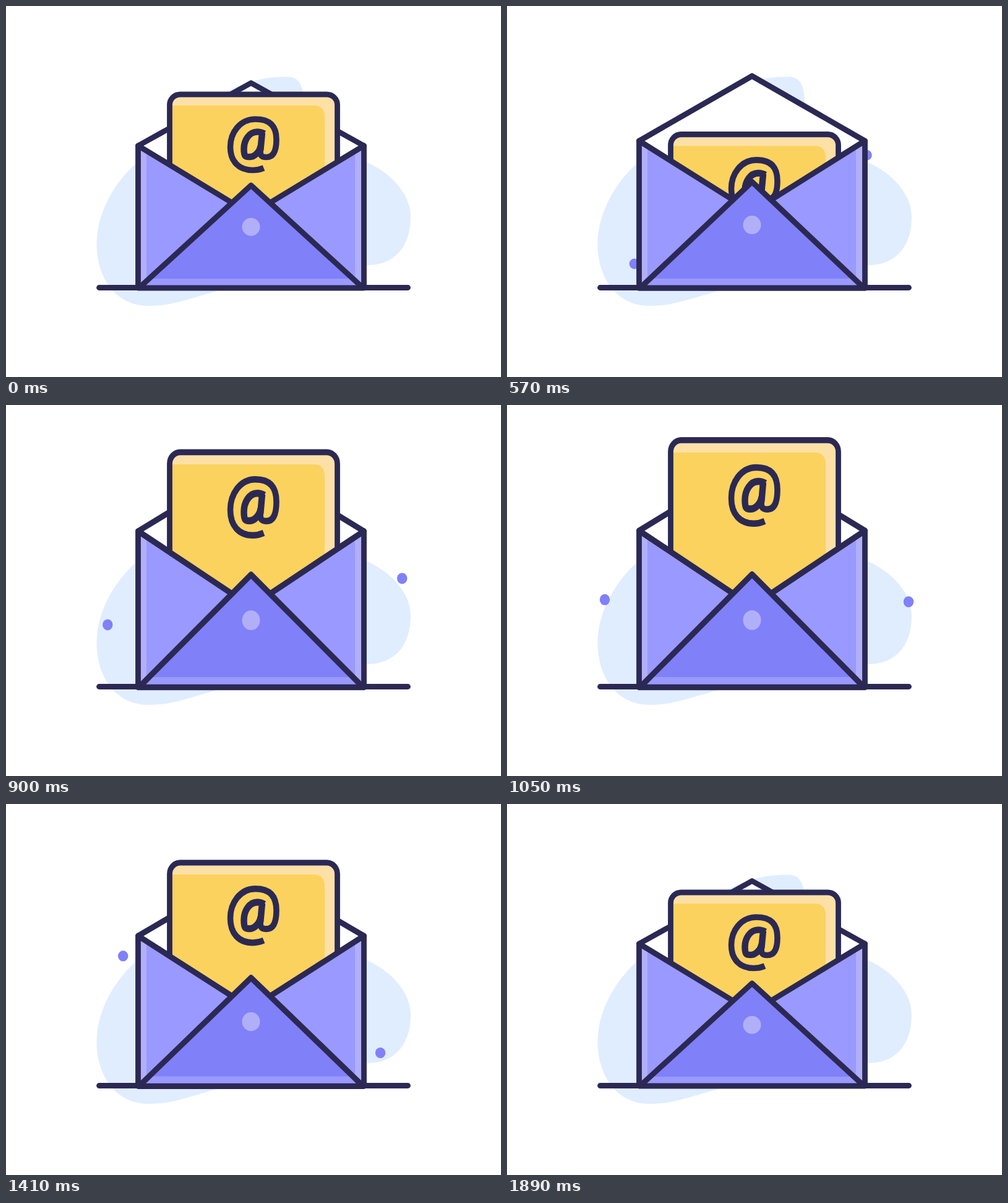
Animation of 800x600 px, one loop 1950 ms. Source, as an HTML page:

```html
<!DOCTYPE html>
<html lang="en">
<head>
<meta charset="utf-8">
<title>Mail</title>
<style>
  html, body { margin: 0; width: 100%; height: 100%; overflow: hidden; background: #fff; }
  svg { display: block; width: 100vw; height: 100vh; }
  .line { stroke: #2b2954; stroke-width: 8.8; stroke-linecap: round; stroke-linejoin: round; }
  .none { fill: none; }
  .dot { fill: #8080f9; }
  .panel { fill: #9a99ff; }
  .shine { fill: #b1aff8; }
</style>
</head>
<body>
<svg viewBox="0 0 800 600">
  <defs>
    <clipPath id="pocket"><rect x="200" y="-50" width="400" height="480"/></clipPath>
  </defs>

  <path fill="#e0edff" d="M146.5 385C146.5 335 175 285 212 253S290 175 340 147S420 114.500 455 114.500C476 114.500 481 132 481 160S505 237 550 243S654 290 654 341S625 419 585 419S400 443 340 461S262 485 231 485C175 485 146.500 437 146.500 385Z"/>
  <path class="line" d="M150.500 455.500H649.500"/>

  <g id="mail">
    <path class="line" fill="#fff" d="M213.500 226L396 124.500L578.500 226L396 336Z"/>
    <circle id="left" class="dot" r="8.200"/>
    <circle id="right" class="dot" r="8.200"/>

    <g clip-path="url(#pocket)">
      <g id="card">
        <rect x="264.500" y="143" width="271" height="290" rx="17" fill="#fde0a6"/>
        <path fill="#fcd25f" d="M266 161H497Q515 161 515 179V431H266Z"/>
        <rect class="line none" x="264.500" y="143" width="271" height="290" rx="17"/>
        <g class="none" stroke="#2b2954">
          <path stroke-width="9.600" d="M416.500 262Q408 265.500 399 265.500C376 265.500 362.500 251 362.500 228S378 183 403 183S437 196 437 216S431 244.500 421 244.500S410.500 240 411.500 231"/>
          <path stroke-width="10.500" d="M411.300 233L414 205M417.500 206.500Q412 203.500 406 203.500C393 203.500 384.500 217 384.500 231S388 244 394.500 244S410.500 236 411.500 226"/>
        </g>
      </g>
    </g>

    <path class="panel" d="M213.500 226L365 318L396 290L427 318L578.500 226V456H213.500Z"/>
    <path class="shine" d="M213.500 226L227 234.200V456H213.500ZM578.500 226L564 234.800V456H578.500Z"/>
    <path class="dot" d="M396 290L577 456H215Z"/>
    <path class="panel" d="M231.400 441H560.600L577 456H215Z"/>
    <circle class="shine" cx="396" cy="357.300" r="14.500"/>
    <path class="line none" d="M365 318L213.500 226V456H578.500V226L427 318M216 455L396 290L576 455"/>
  </g>
</svg>

<script>
const LOOP = 1950, STEP = 30, BASE = 451;
const $ = id => document.getElementById(id);

const part = (t, a, b) => Math.min(1, Math.max(0, (t - a) / (b - a)));
const ease = (t, a, b) => {
  const p = part(t, a, b);
  return p * p * (3 - 2 * p);
};
const bezier = (p, a, b, c, d) => {
  const q = 1 - p;
  return q * q * q * a + 3 * q * q * p * b + 3 * q * p * p * c + p * p * p * d;
};

function place(id, x, y) {
  $(id).setAttribute('cx', x);
  $(id).setAttribute('cy', y);
}

function draw(t) {
  // The envelope stretches up from its base and settles again.
  const s = 1 + 0.102 * (ease(t, 300, 990) - ease(t, 990, 1890));
  $('mail').setAttribute('transform', `translate(0 ${BASE * (1 - s)}) scale(1 ${s})`);

  // The card drops in, shoots out, hangs and sinks to rest.
  const y = 126 * part(t, 0, 60) - 176 * ease(t, 300, 1040) + 50 * ease(t, 1170, 1710);
  $('card').setAttribute('transform', `translate(0 ${y})`);

  // The dots swing clockwise, one on each side.
  const p = t < 60 ? 1 : ease(t, 330, 1770);
  place('left', bezier(p, 224, 136, 136, 224), bezier(p, 428, 390, 260, 240));
  place('right', bezier(p, 556, 680, 680, 556), bezier(p, 241, 267, 391, 428));
}

const start = performance.now();
function tick() {
  const t = (performance.now() - start) % LOOP;
  draw(Math.floor(t / STEP) * STEP);
  requestAnimationFrame(tick);
}
tick();
</script>
</body>
</html>
```
